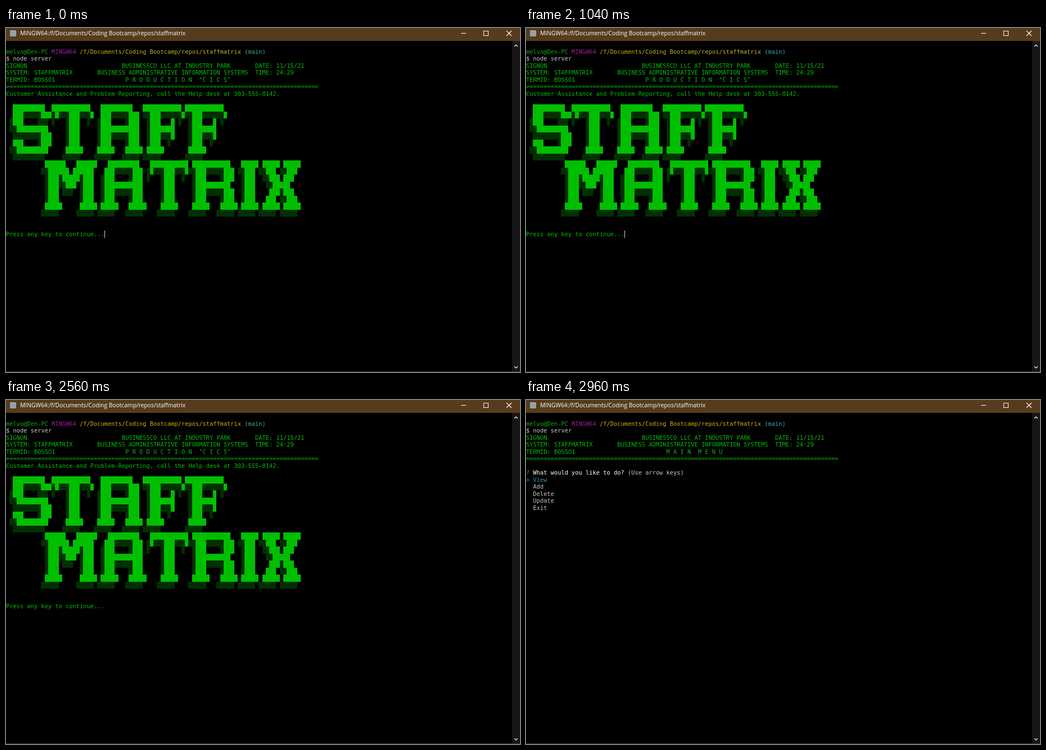
These frames come from a looping animation (914x613 px, 8 s). An HTML page with a canvas:

```html
<!DOCTYPE html>
<html lang="en">
<head>
<meta charset="utf-8">
<title>Terminal</title>
<style>
html, body { margin: 0; width: 100%; height: 100%; overflow: hidden; background: #000; }
canvas { display: block; }
</style>
</head>
<body>
<canvas id="stage" width="914" height="613"></canvas>
<script>
const ctx = document.getElementById('stage').getContext('2d');
const W = 914, H = 613, LOOP = 8000;
const CELL = 6.24, LINE = 12.5, TOP = 36, BASE = 9.6;
const MENU_AT = 2960;
const BLINKS = [460, 1040, 1520, 2030, 2560, 2890];
const GREEN = '#00bf00', SHADE = '#003000', GREY = '#c6c6c6';
const PATH = '/f/Documents/Coding Bootcamp/repos/staffmatrix';

// '#' is a full block, ':' a light shade
const GLYPHS = {
  S: ['  ######### ', ' ###:::::###', ':###    ::: ', '::######### ',
      ' ::::::::###', ' ###    :###', '::######### ', ' :::::::::  '],
  T: [' ###########', ':#:::###:::#', ':   :###  : ', '    :###    ',
      '    :###    ', '    :###    ', '    #####   ', '   :::::    '],
  A: ['   #########  ', '  ###:::::### ', ' :###    :### ', ' :########### ',
      ' :###:::::### ', ' :###    :### ', ' #####   #####', ':::::   ::::: '],
  F: [' ###########', '::###::::::#', ' :###   # : ', ' :#######   ',
      ' :###:::#   ', ' :###  :    ', ' #####      ', ':::::       '],
  M: [' ######   ######', '::###### ###### ', ' :###:#####:### ', ' :###::### :### ',
      ' :### :::  :### ', ' :###      :### ', ' #####     #####', ':::::     ::::: '],
  R: [' ###########  ', '::###:::::### ', ' :###    :### ', ' :##########  ',
      ' :###:::::### ', ' :###    :### ', ' #####   #####', ':::::   ::::: '],
  I: [' #####', '::### ', ' :### ', ' :### ', ' :### ', ' :### ', ' #####', '::::: '],
  X: [' ##### #####', '::### ::### ', ' ::### ###  ', '  ::#####   ',
      '   ###:###  ', '  ### ::### ', ' ##### #####', '::::: ::::: ']
};

function rect(x0, y0, x1, y1, color) {
  ctx.fillStyle = color;
  ctx.fillRect(x0, y0, x1 - x0, y1 - y0);
}

// Text on the character grid
function put(row, col, text, color) {
  ctx.font = '10.37px "DejaVu Sans Mono", monospace';
  ctx.fillStyle = color;
  [...text].forEach((ch, i) => {
    if (ch !== ' ') ctx.fillText(ch, (col + i) * CELL, TOP + row * LINE + BASE);
  });
}

function banner(word, row, col, indent) {
  for (let r = 0; r < 8; r++) {
    const line = [...word].map(ch => GLYPHS[ch][r]).join('');
    const left = col + (r ? indent : 0);
    const y0 = Math.round(TOP + (row + r) * LINE);
    const y1 = Math.round(TOP + (row + r + 1) * LINE);
    for (const run of line.matchAll(/#+|:+/g)) {
      const x0 = Math.round((left + run.index) * CELL);
      const x1 = Math.round((left + run.index + run[0].length) * CELL);
      rect(x0, y0, x1, y1, run[0][0] === '#' ? GREEN : SHADE);
    }
  }
}

function stroke(points, color, width) {
  ctx.strokeStyle = color;
  ctx.lineWidth = width;
  ctx.beginPath();
  points.forEach(([x, y], i) => i ? ctx.lineTo(x, y) : ctx.moveTo(x, y));
  ctx.stroke();
}

function frame() {
  rect(0, 0, W, H, '#000');
  rect(0, 0, W, 23, '#563c1d');
  rect(7, 4, 18, 15, '#95a3a8');
  ctx.font = '10.3px "Open Sans", sans-serif';
  ctx.fillStyle = '#fff';
  ctx.fillText('MINGW64:' + PATH, 25, 13);

  stroke([[809, 9.5], [818, 9.5]], '#fff', 1);
  ctx.strokeRect(849.5, 5.5, 8, 8);
  stroke([[890, 5], [899, 14]], '#fff', 1.1);
  stroke([[899, 5], [890, 14]], '#fff', 1.1);

  rect(900, 23, W, H, '#171717');
  stroke([[904, 33], [907, 30], [910, 33]], '#d8d8d8', 1.5);
  stroke([[904, 603], [907, 606], [910, 603]], '#d8d8d8', 1.5);
  rect(0, 612, W, H, '#48351d');
}

function header() {
  put(0, 0, 'melvo@Den-PC', '#13a813');
  put(0, 13, 'MINGW64', '#9c1f9c');
  put(0, 21, PATH, '#c2b412');
  put(0, 68, '(main)', '#38aab0');
  put(1, 0, '$ node server', GREY);
  put(2, 0, 'SIGNON', GREEN);
  put(2, 33, 'BUSINESSCO LLC AT INDUSTRY PARK', GREEN);
  put(2, 71, 'DATE: 11/15/21', GREEN);
  put(3, 0, 'SYSTEM: STAFFMATRIX', GREEN);
  put(3, 26, 'BUSINESS ADMINISTRATIVE INFORMATION SYSTEMS', GREEN);
  put(3, 71, 'TIME: 24:29', GREEN);
  put(4, 0, 'TERMID: BOSSO1', GREEN);
  put(5, 0, '='.repeat(89), GREEN);
}

function splash(cursor) {
  put(4, 34, 'P R O D U C T I O N  "C I C S"', GREEN);
  put(6, 0, 'Customer Assistance and Problem Reporting, call the Help desk at 303-555-0142.', GREEN);
  banner('STAFF', 8, 0, 1);
  banner('MATRIX', 16, 10, 0);
  put(26, 0, 'Press any key to continue...', GREEN);
  if (cursor) rect(175, 361, 176, 374, '#cfcfcf');
}

function menu() {
  put(4, 40, 'M A I N  M E N U', GREEN);
  put(7, 0, '?', '#13a813');
  put(7, 2, 'What would you like to do?', '#fff');
  put(7, 29, '(Use arrow keys)', GREY);
  put(8, 0, '> View', '#1c98b8');
  ['Add', 'Delete', 'Update', 'Exit'].forEach((item, i) => put(9 + i, 2, item, GREY));
}

let shown = '';
function tick() {
  const t = performance.now() % LOOP;
  const cursor = BLINKS.filter(b => t >= b).length % 2 === 0;
  const state = t >= MENU_AT ? 'menu' : cursor ? 'on' : 'off';
  if (state !== shown) {
    shown = state;
    frame();
    header();
    if (state === 'menu') menu();
    else splash(cursor);
  }
  requestAnimationFrame(tick);
}
tick();
</script>
</body>
</html>
```
